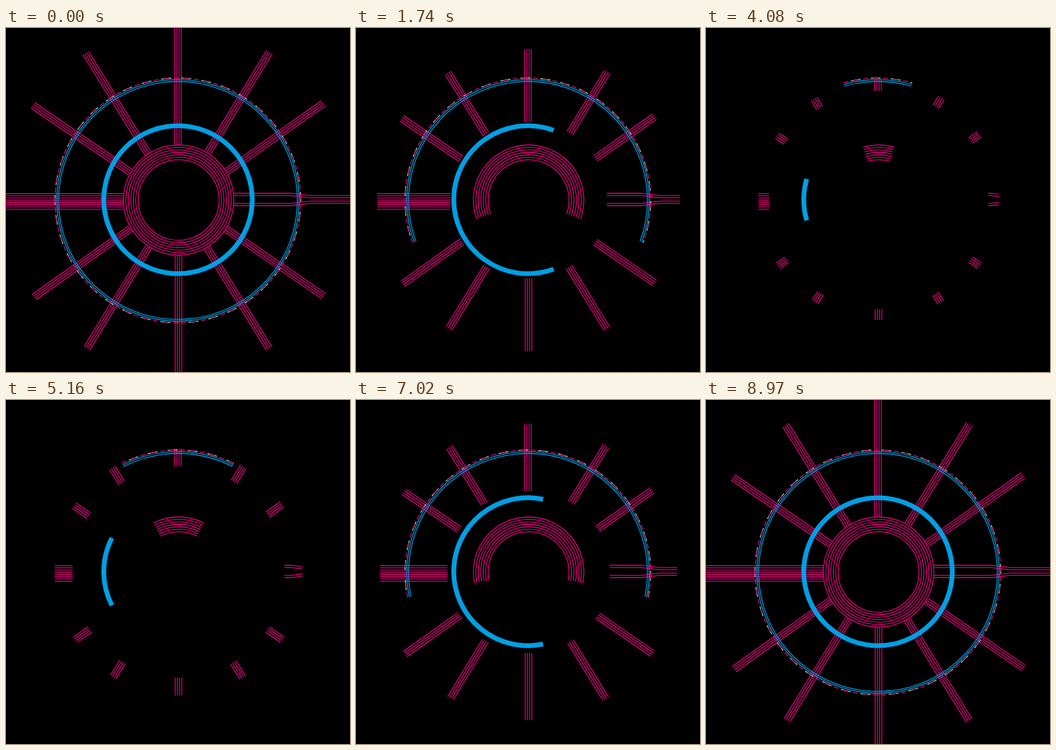
An HTML page that plays this animation: 548x550 px, repeating every 9 s.

```html
<!DOCTYPE html>
<html lang="en">
<head>
<meta charset="utf-8">
<title>Radial lines</title>
<style>
html, body { margin: 0; width: 100%; height: 100%; overflow: hidden; background: #000; }
svg { display: block; width: 548px; height: 550px; }
</style>
</head>
<body>
<svg id="stage" viewBox="0 0 548 550" fill="none"></svg>
<script>
const PINK = '#e6007e', BLUE = '#009fe3', PALE = '#b4dcb4';
const THIN = 1.35, GAP = 3.5;
const STEP = 30, STEPS = 300;
const TOP = -Math.PI / 2, LEFT = Math.PI;
const stage = document.getElementById('stage');
const lines = [], arcs = [];

function addPath(attrs) {
  const path = document.createElementNS('http://www.w3.org/2000/svg', 'path');
  for (const key in attrs) path.setAttribute(key, attrs[key]);
  return stage.appendChild(path);
}

function addLine(d) {
  lines.push(addPath({ d, stroke: PINK, 'stroke-width': THIN, pathLength: 1 }));
}

// Parallel lines around the axis from (cx-dx, cy-dy) to (cx+dx, cy+dy).
function addBundle(cx, cy, dx, dy, count = 4, gap = GAP) {
  const length = Math.hypot(dx, dy);
  for (let i = 0; i < count; i++) {
    const shift = (i - (count - 1) / 2) * gap;
    const x = cx - dy / length * shift, y = cy + dx / length * shift;
    addLine(`M${x - dx} ${y - dy}L${x + dx} ${y + dy}`);
  }
}

function addArc(cx, cy, r, middle, stroke, width, dash = 'none', offset = 0) {
  const path = addPath({
    stroke, 'stroke-width': width, 'stroke-dasharray': dash, 'stroke-dashoffset': offset
  });
  arcs.push({ path, cx, cy, r, middle });
}

function arcData({ cx, cy, r, middle }, part) {
  const point = a => `${cx + r * Math.cos(a)} ${cy + r * Math.sin(a)}`;
  const half = Math.PI * part, to = `A${r} ${r} 0 0 1 `;
  return 'M' + point(middle - half) + to + point(middle) + to + point(middle + half);
}

// Spokes
addBundle(274, 92, 0, 95.15);
addBundle(274.8, 458.3, 0, 95.15);
addBundle(92, 277.2, 95.15, 0, 8, 3.55);
addBundle(370.6, 118.9, 49.1, -80.3);
addBundle(428.4, 175.2, 77.1, -54.8);
addBundle(428.6, 375.2, 77.8, 53.8);
addBundle(369.7, 431.8, 49.7, 81.2);
addBundle(178.3, 430.9, 49.3, -81.2);
addBundle(121.9, 375.2, 77.3, -55.2);
addBundle(120.4, 177, 77.8, 53.5);
addBundle(176.7, 120.6, 49.7, 80.5);

// Narrowing track on the right
for (const [from, to] of [[264.2, 267.8], [267.8, 271.3], [280.4, 276.8], [284, 280.4]])
  addLine(`M362.6 ${from}H454L484 ${to}H553.1`);

// Rings
for (let i = 0; i < 7; i++) addArc(275, 275, 88 - i * 3.93, TOP, PINK, THIN);
addArc(273.8, 275.7, 195.7, TOP, PALE, THIN, '16 16', -12);
addArc(273.8, 275.7, 195.7, TOP, PINK, THIN, '8 8');
addArc(274, 275.7, 193.1, TOP, BLUE, THIN);
addArc(274, 275.7, 190.2, TOP, BLUE, THIN);
addArc(274, 274.5, 118.3, LEFT, BLUE, 7.6);

function draw(time) {
  const step = Math.floor(time / STEP) % STEPS, middle = (STEPS - 1) / 2;
  const part = Math.abs(step - middle) / middle;
  for (const line of lines) {
    line.setAttribute('stroke-dasharray', `${part} 2`);
    line.setAttribute('stroke-dashoffset', (part - 1) / 2);
  }
  for (const arc of arcs) arc.path.setAttribute('d', arcData(arc, part));
}

const start = performance.now();
function tick() {
  draw(performance.now() - start);
  requestAnimationFrame(tick);
}
tick();
</script>
</body>
</html>
```
